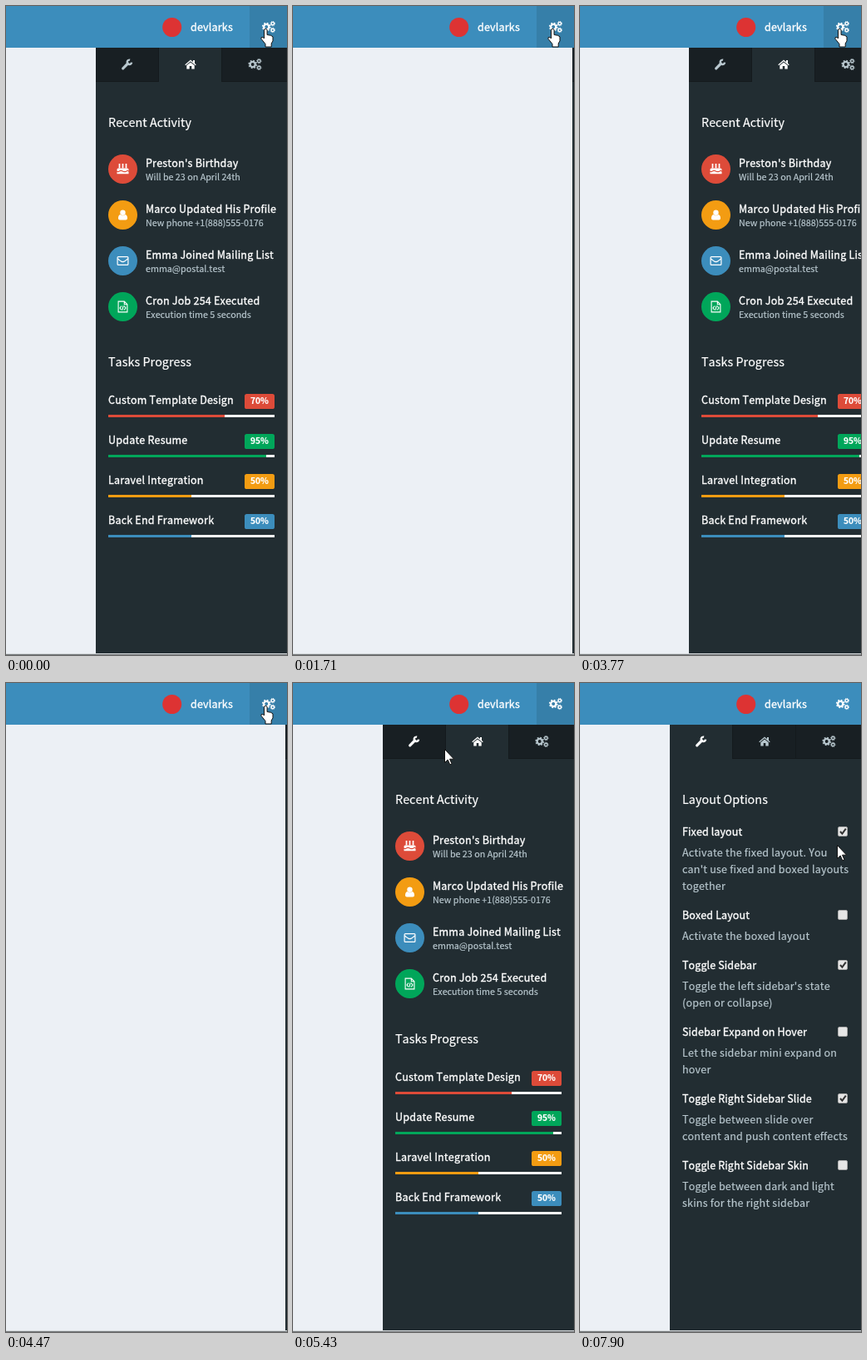
Animation of 338 by 778 pixels, one loop 8000 ms. Source, as an HTML page:

```html
<!DOCTYPE html>
<html lang="en">
<head>
<meta charset="utf-8">
<title>Control sidebar</title>
<style>
html, body { margin: 0; width: 100%; height: 100%; overflow: hidden; background: #ecf0f5; }
svg { display: block; width: 338px; height: 778px; }
text { font: 12.53px "Noto Sans CJK JP", "Noto Sans CJK SC", "Noto Sans CJK", "Open Sans", sans-serif; font-kerning: none; letter-spacing: .2px; fill: #fff; stroke: #fff; stroke-width: .35; }
.head { font-size: 14.32px; letter-spacing: .05px; stroke-width: .2; }
.sub { font-size: 10.74px; letter-spacing: 0; }
.sub, .body { fill: #b8c7ce; stroke: #b8c7ce; stroke-width: .2; }
.option { letter-spacing: .1px; }
.badge { font-size: 10.2px; font-weight: 700; letter-spacing: 0; text-anchor: middle; stroke-width: .2; }
.tab { fill: #181f23; color: #b8c7ce; }
.tab.on { fill: #222d32; color: #fff; }
.tab.hover { color: #fff; }
.tab .edge { fill: #141a1d; }
.tab.on .edge.low { fill: none; }
</style>
</head>
<body>
<svg viewBox="0 0 338 778">
  <defs>
    <!-- icons are centred on 0,0 -->
    <g id="wrench" fill="none" stroke="currentColor">
      <path d="M-4.8 4.8 1 -1" stroke-width="3.2" stroke-linecap="round"/>
      <path d="M3.6 -5.3A2.7 2.7 0 1 0 5.6 -2.4" stroke-width="2.4"/>
    </g>
    <g id="home" fill="currentColor">
      <path d="M0 -5.5 6.7 .2 5.9 1.2 0 -3.7 -5.9 1.2 -6.7 .2ZM3 -5H5V-1L3 -2.7Z"/>
      <path d="M0 -2.6 4.7 1.3V5.5H1.3V2H-1.3V5.5H-4.7V1.3Z"/>
    </g>
    <g id="cogs" fill="none" stroke="currentColor">
      <circle cx="-2.8" r="3.1" stroke-width="2.3"/>
      <circle cx="-2.8" r="4.6" stroke-width="1.5" stroke-dasharray="1.8 1.81"/>
      <g id="cog">
        <circle cx="4.8" cy="-3.9" r="1.7" stroke-width="1.4"/>
        <circle cx="4.8" cy="-3.9" r="2.7" stroke-width="1" stroke-dasharray="1.1 1.02"/>
      </g>
      <use href="#cog" y="7.8"/>
    </g>
    <g id="cake" fill="#fff">
      <path d="M-7 5.8V3.2Q-5.7 4.3 -4.4 3.2 -2.3 1.8 0 3.2 2.3 4.4 4.4 3.2 5.7 1.8 7 3.2V5.8Z"/>
      <path d="M-7 1.9V.5Q-7 -1 -5.5 -1H5.5Q7 -1 7 .5V1.9Q5.7 .8 4.4 1.9 2.3 3.2 0 1.9 -2.3 .8 -4.4 1.9 -5.7 3 -7 1.9Z"/>
      <path d="M-4 -1V-6.5M0 -1V-6.5M4 -1V-6.5" stroke="#fff" stroke-width="1.7"/>
    </g>
    <g id="user" fill="#fff">
      <circle cy="-2.7" r="3.2"/>
      <path d="M-3 -.5Q0 2 3 -.5 5.5 0 5.5 4 5.5 6 3.5 6H-3.5Q-5.5 6 -5.5 4 -5.5 0 -3 -.5Z"/>
    </g>
    <g id="mail" fill="none" stroke="#fff" stroke-width="1.2">
      <rect x="-6.4" y="-4.9" width="12.8" height="9.8" rx="1"/>
      <path d="M-6.2 -2.8Q-2 1.2 0 1.2T6.2 -2.8"/>
    </g>
    <g id="code" fill="none" stroke="#fff" stroke-width="1.1">
      <path d="M-5.4 -6.4H1.8L5.4 -2.8V6.4H-5.4ZM1.8 -6.4V-2.8H5.4"/>
      <path d="M-1.6 -.8-3.5 1.5-1.6 3.8M1.6 -.8 3.5 1.5 1.6 3.8M.5 -1.2-.5 4.2"/>
    </g>
    <path id="hand" d="M4.5 2.2a1.8 1.8 0 0 1 3.6 0V7.5l4.6 .8 2.3 1.6v5L13.2 18v4H6v-3.4L1 12.4Q.4 9.8 3 10.4L4.5 12Z"/>
    <path id="arrow" d="M.5 .5V16.5L4.2 13 6.8 18.8 9 17.8 6.5 12.2H11.6Z"/>
  </defs>

  <rect width="338" height="50" fill="#3c8dbc"/>
  <rect id="gearButton" x="293" width="45" height="50" fill="#367fa9"/>
  <circle cx="199.7" cy="25.5" r="11.5" fill="#dd3333"/>
  <text x="222" y="30">devlarks</text>
  <use href="#cogs" x="316" y="25" color="#fff"/>

  <g id="panel">
    <rect y="50" width="230" height="726" fill="#222d32"/>
    <g id="tabs"></g>
    <g id="activity"></g>
    <g id="options"></g>
  </g>
  <rect y="776" width="338" height="1" fill="#d8dcde"/>
  <rect y="777" width="338" height="1" fill="#75797c"/>
  <use id="cursor" fill="#fff" stroke="#111"/>
</svg>
<script>
const $ = id => document.getElementById(id);
const label = (x, y, text, cls = "") => `<text x="${x}" y="${y}" class="${cls}">${text}</text>`;
const red = "#dd4b39", amber = "#f39c12", blue = "#3c8dbc", green = "#00a65a";

// Panel coordinates: x = 0 is the left edge of the sidebar.
$("tabs").innerHTML = [["wrench", 0, 75, 37.5], ["home", 75, 76, 114], ["cogs", 151, 79, 191.5]]
  .map(([icon, x, w, mid]) => `<g class="tab"><rect x="${x}" y="50" width="${w}" height="41"/>
    <rect class="edge" x="${x}" y="50" width="${x && 1}" height="41"/>
    <rect class="edge low" x="${x}" y="90" width="${w}" height="1"/>
    <use href="#${icon}" x="${mid}" y="70"/></g>`).join("");

const events = [
  ["cake", red, "Preston's Birthday", "Will be 23 on April 24th"],
  ["user", amber, "Marco Updated His Profile", "New phone +1(888)555-0176"],
  ["mail", blue, "Emma Joined Mailing List", "emma@postal.test"],
  ["code", green, "Cron Job 254 Executed", "Execution time 5 seconds"]
];
const tasks = [
  ["Custom Template Design", 70, red],
  ["Update Resume", 95, green],
  ["Laravel Integration", 50, amber],
  ["Back End Framework", 50, blue]
];
$("activity").innerHTML = label(15, 145, "Recent Activity", "head") +
  events.map(([icon, color, title, note], i) => {
    const y = 195.5 + 55 * i;
    return `<circle cx="32.5" cy="${y}" r="17.5" fill="${color}"/><use href="#${icon}" x="32.5" y="${y}"/>` +
      label(60, y - 2.5, title) + label(60, y + 13.5, note, "sub");
  }).join("") +
  label(15, 432, "Tasks Progress", "head") +
  tasks.map(([title, done, color], i) => {
    const y = 477 + 48 * i;
    return label(15, y, title) +
      `<rect x="179" y="${y - 12}" width="36" height="18" rx="2.6" fill="${color}"/>` +
      label(197, y, done + "%", "badge") +
      `<rect x="15" y="${y + 13}" width="200" height="3" fill="#f5f5f5"/>
       <rect x="15" y="${y + 13}" width="${done * 2}" height="3" fill="${color}"/>`;
  }).join("");

const settings = [
  [183, "Fixed layout", 1, "Activate the fixed layout. You", "can't use fixed and boxed layouts", "together"],
  [283, "Boxed Layout", 0, "Activate the boxed layout"],
  [343, "Toggle Sidebar", 1, "Toggle the left sidebar's state", "(open or collapse)"],
  [423, "Sidebar Expand on Hover", 0, "Let the sidebar mini expand on", "hover"],
  [503, "Toggle Right Sidebar Slide", 1, "Toggle between slide over", "content and push content effects"],
  [583, "Toggle Right Sidebar Skin", 0, "Toggle between dark and light", "skins for the right sidebar"]
];
$("options").innerHTML = label(15, 145, "Layout Options", "head") +
  settings.map(([y, title, checked, ...lines]) => label(15, y, title, "option") +
    `<rect x="202.5" y="${y - 10.5}" width="11" height="11" rx="1.5" fill="#e6e6e6" stroke="#a9a9a9"/>` +
    (checked ? `<path class="tick" d="M205 ${y - 5}l2.4 2.6 4.4-6" fill="none" stroke="#333" stroke-width="2"/>` : "") +
    lines.map((line, i) => label(15, y + 25 + 20 * i, line, "body")).join("")
  ).join("");

// [time, x]: the sidebar slides in held steps
const slide = [[0, 108], [720, 121], [870, 285], [990, 338], [1710, 336], [1840, 223], [1990, 108],
  [3770, 131], [3910, 315], [4060, 338], [4470, 336], [4610, 212], [4730, 110], [4880, 108]];
// [time, x, y]
const pointer = [[0, 306, 27], [4610, 285, 48], [4730, 246, 63], [4880, 226, 78], [5010, 204, 90],
  [5150, 198, 84], [5280, 193, 80], [5430, 182, 79], [5560, 172, 80], [5710, 157, 76], [5860, 161, 75],
  [6580, 164, 76], [6730, 194, 118], [6850, 227, 159], [6990, 262, 170], [7120, 288, 175],
  [7240, 305, 176], [7380, 312, 177], [7770, 310, 188], [7900, 309, 194]];
const held = (steps, t) => steps.findLast(step => step[0] <= t);

const tabs = [...document.querySelectorAll(".tab")];
const firstTick = document.querySelector(".tick");
const show = (el, on) => el.style.display = on ? "" : "none";
const start = performance.now();

function draw() {
  const t = (performance.now() - start) % 8000;
  const opened = t >= 5860;
  $("panel").setAttribute("transform", `translate(${held(slide, t)[1]} 0)`);
  const [, x, y] = held(pointer, t);
  $("cursor").setAttribute("href", t < 4610 ? "#hand" : "#arrow");
  $("cursor").setAttribute("transform", `translate(${x} ${y})`);
  show($("gearButton"), !opened);
  show($("activity"), !opened);
  show($("options"), opened);
  show(firstTick, t >= 7620);
  tabs[0].classList.toggle("on", opened);
  tabs[1].classList.toggle("on", !opened);
  tabs[0].classList.toggle("hover", t >= 5430);
  tabs[2].classList.toggle("hover", t >= 4610 && t < 4880);
  requestAnimationFrame(draw);
}
draw();
</script>
</body>
</html>
```
